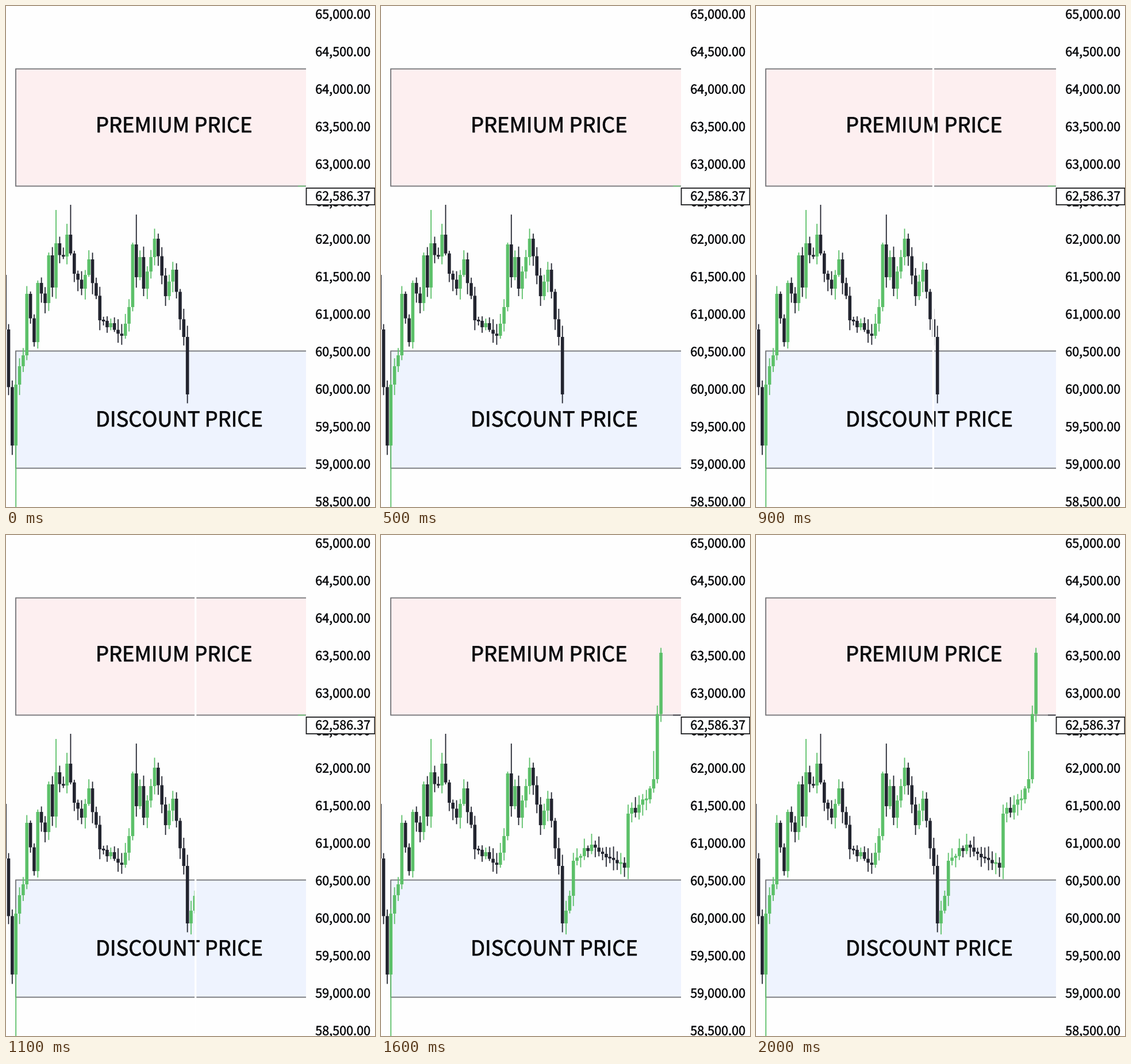
A matplotlib script for the animation above (2.1 s loop, 642 px wide and 872 px high).

```python
import numpy as np
import matplotlib.pyplot as plt
from matplotlib.animation import FuncAnimation
from matplotlib.patches import Rectangle
from matplotlib.patheffects import withStroke

W, H, DPI = 642, 872, 100
FRAMES, INTERVAL = 21, 100
PT = 72 / DPI
FONT = "Noto Sans CJK JP"
GREEN, DARK, EDGE = "#5cc069", "#22242f", "#717276"
PINK, BLUE, PAPER, INK = "#fdeff0", "#eef3fe", "#fefefe", "#0c0d10"
PLOT_RIGHT = 522

# Turning points of the price: candle index and screen height.
SWINGS = [
    (-1, 563), (1, 765), (2, 659), (4, 608), (5, 501), (7, 585), (8, 482),
    (10, 517), (11, 434), (12, 490), (13, 413), (15, 436), (16, 398),
    (18, 466), (20, 492), (22, 441), (25, 547), (31, 574), (33, 524),
    (34, 415), (35, 472), (36, 437), (37, 492), (40, 405), (43, 505),
    (45, 459), (48, 576), (49, 676), (51, 628), (52, 567), (57, 539),
    (66, 579), (67, 485), (72, 460), (74, 425), (76, 205),
]
LONG_WICKS = {2: 112, 13: -58, 17: -52, 35: -52, 74: -49}  # negative: upwards

SWEEP_FROM, SWEEP_START, SWEEP_STOP, SWEEP_SPAN = 307, 7, 16, 11.8
REVEALED = 319

plt.rcParams["path.snap"] = False
fig = plt.figure(figsize=(W / DPI, H / DPI), dpi=DPI, facecolor=PAPER)
ax = fig.add_axes([0, 0, 1, 1])
ax.set_xlim(0, W)
ax.set_ylim(H, 0)
ax.axis("off")


def line(xs, ys, color, width, z):
    return ax.plot(xs, ys, color=color, lw=width * PT, zorder=z,
                   solid_capstyle="butt", solid_joinstyle="miter")[0]


def label(x, baseline, text, size, weight, z=2):
    stroke = withStroke(linewidth=weight * PT, foreground=INK)
    ax.text(x, baseline, text, family=FONT, fontsize=size * PT, color=INK,
            va="baseline", zorder=z, path_effects=[stroke])


def zone(top, bottom, fill, text, baseline):
    ax.add_patch(Rectangle((17, top), PLOT_RIGHT - 17, bottom - top,
                           fc=fill, ec="none", zorder=1))
    line([PLOT_RIGHT, 17, 17, PLOT_RIGHT], [top, top, bottom, bottom],
         EDGE, 1.8, 2)
    label(156, baseline, text, 36.3, 0.7, 5)


def bars(x, top, bottom, colors, width):
    return ax.vlines(x, top, bottom, colors=colors, lw=width * PT,
                     capstyle="butt", zorder=4)


def draw_candles():
    rng = np.random.default_rng(4)
    turns, levels = zip(*SWINGS)
    index = np.arange(-1, turns[-1] + 1)
    noise = np.where(np.isin(index, turns), 0, rng.normal(0, 4, index.size))
    path = np.interp(index, turns, levels) + noise
    start, close = path[:-1], path[1:]
    top, bottom = np.minimum(start, close), np.maximum(start, close)
    high = top - rng.uniform(3, 20, top.size)
    low = bottom + rng.uniform(3, 20, top.size)
    for i, reach in LONG_WICKS.items():
        high[i] = min(high[i], top[i] + reach)
        low[i] = max(low[i], bottom[i] + reach)

    x = 4.5 + 6.35 * index[1:]
    colors = np.where(close < start, GREEN, DARK)
    thin = np.maximum(0, 3 - (bottom - top)) / 2
    return [bars(x, high, low, colors, 1.8),
            bars(x, top - thin, bottom + thin, colors, 5.6)]


def draw_scale():
    for k in range(14):
        label(538.2, 22 + 65.27 * k, f"{65000 - 500 * k:,.2f}", 21.6, 0.4)
    ax.add_patch(Rectangle((522.5, 317), 119, 29, fc="white", ec="#191a1d",
                           lw=1.8 * PT, zorder=3))
    label(538.2, 338.5, "62,586.37", 21.6, 0.3, 4)


def ease(t):
    return 8 * t**4 if t < 0.5 else 1 - 8 * (1 - t)**4


zone(109.5, 313.5, PINK, "PREMIUM PRICE", 220)
zone(600.5, 804.5, BLUE, "DISCOUNT PRICE", 732)
draw_scale()
line([0, 0], [468, 563], DARK, 2, 4)
candles = draw_candles()
tick = line([508, 521], [313.5, 313.5], GREEN, 1.4, 3)
sweep = line([0, 0], [0, H], "white", 3.2, 6)


def update(n):
    done = n >= SWEEP_STOP
    t = np.clip((n - SWEEP_START) / SWEEP_SPAN, 0, 1)
    x = SWEEP_FROM + (PLOT_RIGHT - SWEEP_FROM) * ease(t)
    edge = W if done else max(REVEALED, x)
    window = Rectangle((0, 0), edge, H, transform=ax.transData)
    for part in candles:
        part.set_clip_path(window)
    sweep.set_xdata([x, x])
    sweep.set_visible(SWEEP_START <= n < SWEEP_STOP)
    tick.set_color(DARK if done else GREEN)
    return [*candles, sweep, tick]


anim = FuncAnimation(fig, update, frames=FRAMES, interval=INTERVAL,
                     repeat=True, repeat_delay=0, blit=False)
plt.show()
```
